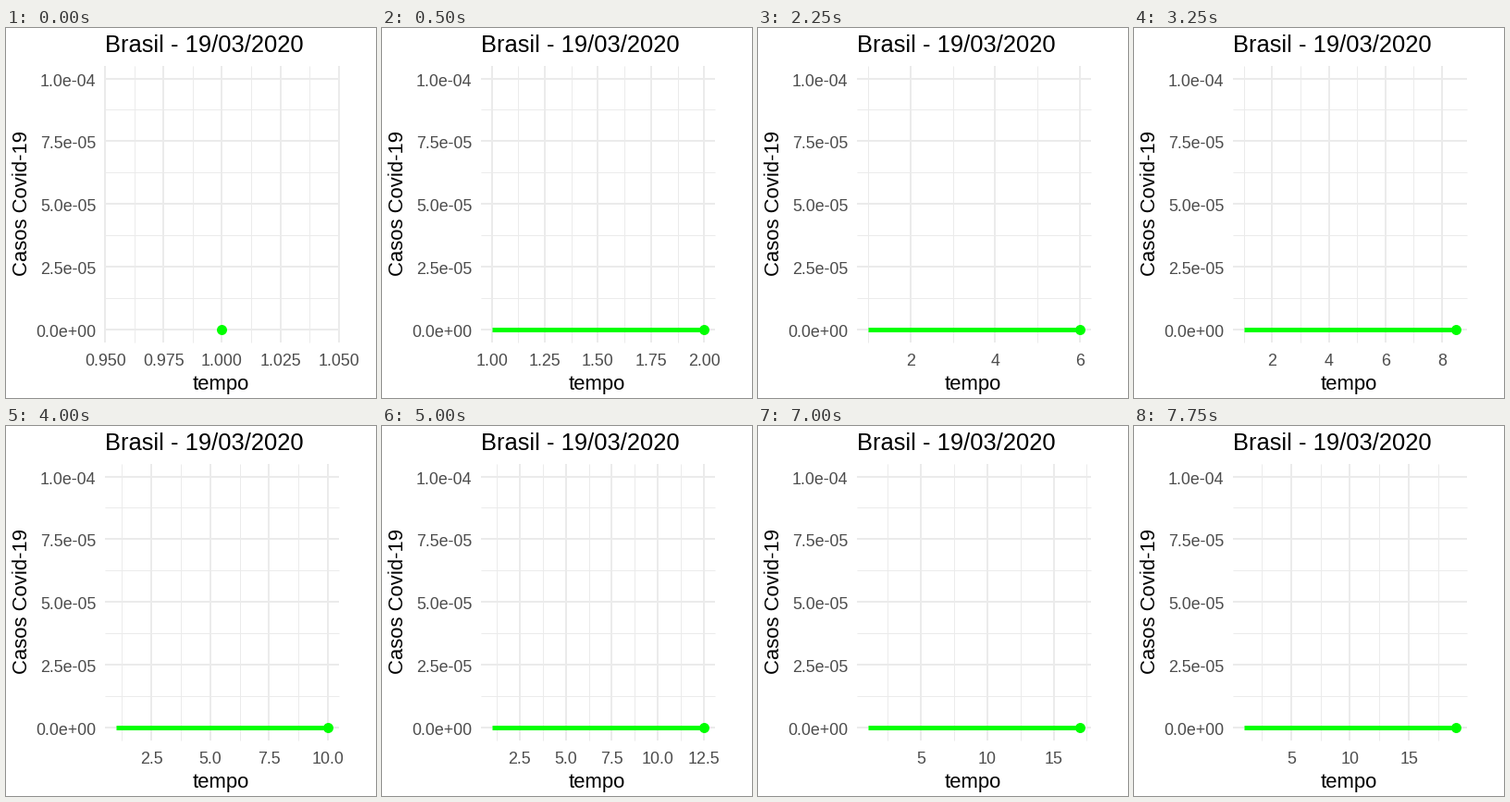
Write a matplotlib script that moves like this. It is 400x400 px and loops after 8 s.

```python
import math

import matplotlib.pyplot as plt
import numpy as np
from matplotlib.animation import FuncAnimation

SIZE, DPI = 400, 100
PT = 72 / DPI                     # points per pixel
LEFT, RIGHT, TOP, BOTTOM = 107.3, 359.65, 41, 340
ZERO_Y, STEP_Y = 326, 67.87
GRID, LABEL, GREEN = "#EBEBEB", "#4D4D4D", "#00FF00"
FRAMES, INTERVAL = 32, 250

# Each day lands on a whole frame of a 100-frame reveal; frames between interpolate.
DAYS = np.arange(1, 59)
DAY_FRAMES = np.round((DAYS - 1) * 99 / 57)


def nice_breaks(lo, hi, m=5):
    """Extended Wilkinson tick search; returns the ticks and their step."""
    nice = [1, 5, 2, 2.5, 4, 3]
    span = hi - lo
    best, found = -2, None

    def total(simple, cover, dense):
        return 0.25 * simple + 0.2 * cover + 0.5 * dense + 0.05

    for j in range(1, 20):
        for i, q in enumerate(nice):
            simple_max = 2 - i / (len(nice) - 1) - j
            if total(simple_max, 1, 1) < best:
                return found
            for k in range(2, 40):
                dense_max = 2 - (k - 1) / (m - 1) if k >= m else 1
                if total(simple_max, 1, dense_max) < best:
                    break
                first = math.ceil(math.log10(span / (k + 1) / j / q))
                for z in range(first, first + 10):
                    step = j * q * 10.0 ** z
                    width = step * (k - 1)
                    half = max(width - span, 0) / 2
                    cover_max = 1 - (half / (0.1 * span)) ** 2
                    if total(simple_max, cover_max, dense_max) < best:
                        break
                    start_lo = math.floor(hi / step) * j - (k - 1) * j
                    start_hi = math.ceil(lo / step) * j
                    for start in range(start_lo, start_hi + 1):
                        a = start * step / j
                        b = a + width
                        has_zero = start % j == 0 and a <= 0 <= b
                        simple = 1 - i / (len(nice) - 1) - j + has_zero
                        miss = (hi - b) ** 2 + (lo - a) ** 2
                        cover = 1 - 0.5 * miss / (0.1 * span) ** 2
                        r = (k - 1) / width
                        rt = (m - 1) / (max(b, hi) - min(a, lo))
                        score = total(simple, cover, 2 - max(r / rt, rt / r))
                        if score > best:
                            best = score
                            found = a + step * np.arange(k), step
    return found


def tick_labels(ticks):
    digits = next(d for d in range(6)
                  if np.allclose(ticks, np.round(ticks, d), atol=1e-9))
    return [f"{t:.{digits}f}" for t in ticks]


fig = plt.figure(figsize=(SIZE / DPI, SIZE / DPI), dpi=DPI, facecolor="white")
ax = fig.add_axes([0, 0, 1, 1])
plt.rcParams["font.family"] = "Liberation Sans"


def text(x, y, s, size, color="black", **kw):
    ax.text(x, y, s, fontsize=size * PT, color=color, va="baseline", **kw)


def grid_line(xs, ys, width):
    ax.plot(xs, ys, color=GRID, lw=width * PT, solid_capstyle="butt",
            zorder=1 + width / 10)


def draw_y_axis():
    names = ["0.0e+00", "2.5e-05", "5.0e-05", "7.5e-05", "1.0e-04"]
    for i, name in enumerate(names):
        y = ZERO_Y - i * STEP_Y
        grid_line([LEFT, RIGHT], [y, y], 2)
        text(97.5, y + 8, name, 17.9, LABEL, ha="right")
        if i < 4:
            mid = y - STEP_Y / 2
            grid_line([LEFT, RIGHT], [mid, mid], 1)


def draw_x_axis(lo, hi, to_px):
    ticks, step = nice_breaks(lo, hi)
    mids = np.append(ticks[0] - step / 2, ticks + step / 2)
    eps = 1e-9
    ticks = ticks[(ticks >= lo - eps) & (ticks <= hi + eps)]
    for x in to_px(mids[(mids >= lo) & (mids <= hi)]):
        grid_line([x, x], [TOP, BOTTOM], 1)
    for x, name in zip(to_px(ticks), tick_labels(ticks)):
        grid_line([x, x], [TOP, BOTTOM], 2)
        text(x, 365, name, 17.9, LABEL, ha="center")


def draw(frame):
    ax.cla()
    ax.set(xlim=(0, SIZE), ylim=(SIZE, 0))
    ax.axis("off")

    now = np.interp(frame, DAY_FRAMES, DAYS)
    pad = 0.05 * (now - 1) if now > 1 else 0.05
    lo, hi = 1 - pad, now + pad

    def to_px(v):
        return LEFT + (v - lo) / (hi - lo) * (RIGHT - LEFT)

    draw_y_axis()
    draw_x_axis(lo, hi, to_px)
    text(107, 26, "Brasil - 19/03/2020", 25.5)
    text(232.5, 391, "tempo", 22.2, ha="center")
    text(23, 190, "Casos Covid-19", 22.2, rotation=90,
         rotation_mode="anchor", ha="center")

    if now > 1:
        ax.plot([to_px(1), to_px(now)], [ZERO_Y, ZERO_Y], color=GREEN,
                lw=5 * PT, solid_capstyle="butt", zorder=3)
    ax.plot([to_px(now)], [ZERO_Y + 0.4], "o", color=GREEN, ms=11 * PT, mew=0,
            zorder=4)
    return []


anim = FuncAnimation(fig, draw, frames=FRAMES, init_func=lambda: [],
                     interval=INTERVAL, repeat=True, repeat_delay=0)
plt.show()
```
